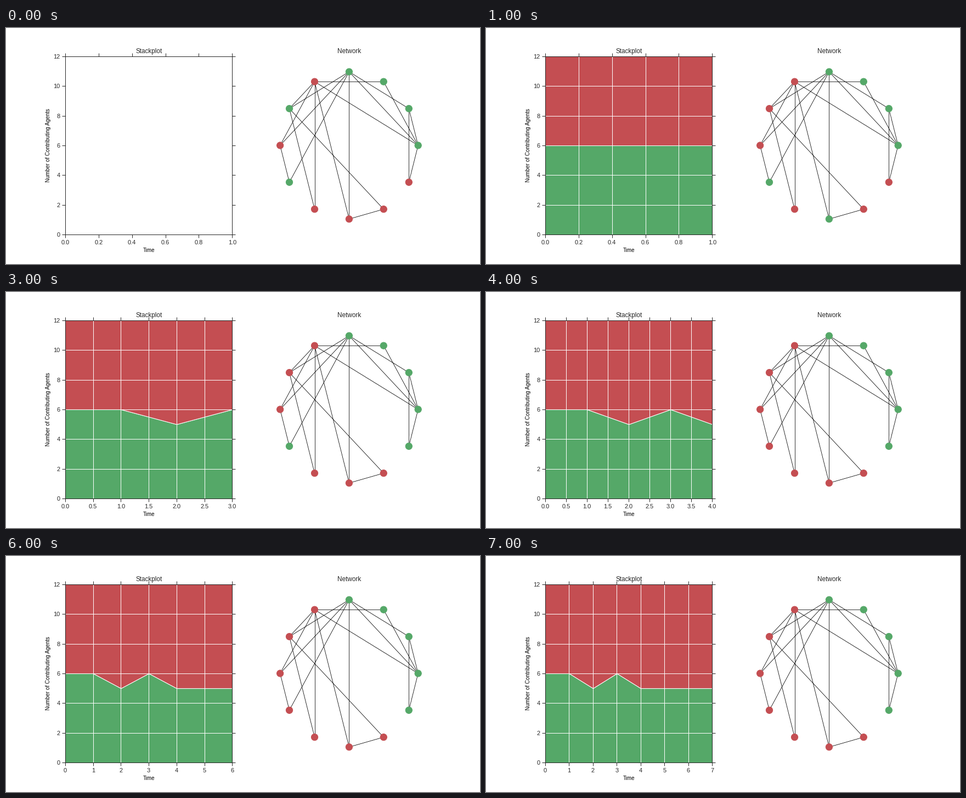
A matplotlib script for the animation above (8000 ms loop, 864 by 432 pixels).

```python
from itertools import pairwise

import numpy as np
import matplotlib.pyplot as plt
from matplotlib.animation import FuncAnimation
from matplotlib.collections import LineCollection

GREEN, RED, INK = "#55A868", "#C44E52", "0.15"
AGENTS = 12
STEPS = 8

# Nodes count counter-clockwise from the right; two trails cover every link.
TRAILS = [
    (0, 2, 4, 0, 3, 1, 0, 11, 1),
    (6, 4, 8, 5, 4, 9, 3, 6, 7, 3, 5, 10, 9),
]

# Contributors at the start, then the agents that change their mind per step.
START = {0, 1, 2, 3, 5, 7}
FLIPS = [{5, 9}, {2, 9, 11}, {2}, {7}]


def givers(step):
    state = START
    for flip in FLIPS[:step]:
        state = state ^ flip
    return state


plt.rcParams.update({
    "font.family": "Liberation Sans",
    "text.color": INK,
    "xtick.color": INK,
    "ytick.color": INK,
    "axes.edgecolor": INK,
    "axes.linewidth": 1,
    "axes.axisbelow": "line",
    "axes.titlesize": 11.8,
    "axes.labelsize": 9.9,
    "axes.labelcolor": "black",
})

fig, (stack_ax, net_ax) = plt.subplots(1, 2, figsize=(12, 6), dpi=72)
fig.subplots_adjust(left=0.125, right=0.9, bottom=0.125, top=0.88, wspace=0.2)
for ax, title in ((stack_ax, "Stackplot"), (net_ax, "Network")):
    ax.set_title(title, y=1.0, pad=6)

stack_ax.set(xlabel="Time", ylabel="Number of Contributing Agents")
stack_ax.tick_params(direction="out", length=6, width=1, pad=3.5,
                     labelsize=11, top=True, right=True)
stack_ax.grid(color="white", linewidth=1, linestyle="-")

angles = 2 * np.pi * np.arange(AGENTS) / AGENTS
nodes = np.column_stack([np.cos(angles), np.sin(angles)])
links = [nodes[list(pair)] for trail in TRAILS for pair in pairwise(trail)]
net_ax.add_collection(LineCollection(links, colors="black", linewidths=0.8, zorder=1))
dots = net_ax.scatter(*nodes.T, s=150, linewidths=1, zorder=2)
net_ax.set(xlim=(-1.21, 1.21), ylim=(-1.21, 1.21))
net_ax.axis("off")

layers = []


def clear():
    while layers:
        layers.pop().remove()
    return []


def draw(step):
    clear()
    dots.set_color([GREEN if n in givers(step) else RED for n in range(AGENTS)])
    if step:
        times = np.arange(step + 1)
        counts = np.array([len(givers(t)) for t in times])
        layers.extend(stack_ax.stackplot(
            times, counts, AGENTS - counts,
            colors=[GREEN, RED], edgecolor="white", linewidth=1))
    stack_ax.set(xlim=(0, max(step, 1)), ylim=(0, AGENTS))
    return []


anim = FuncAnimation(fig, draw, frames=STEPS, init_func=clear,
                     interval=1000, repeat=True, repeat_delay=0, blit=False)
plt.show()
```
